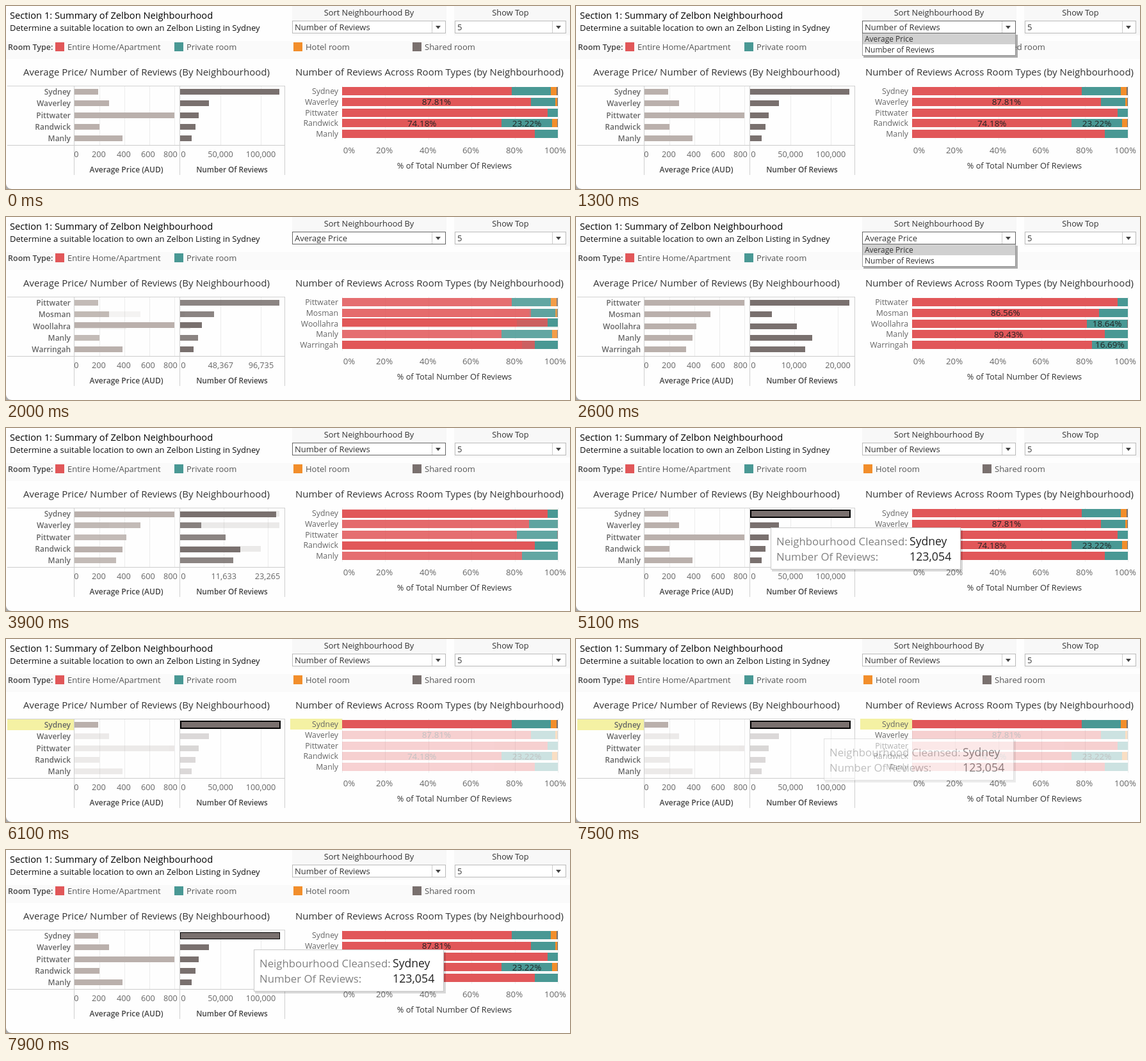
An HTML page that plays this animation: 881x287 px, repeating every 8 s.

```html
<!DOCTYPE html>
<html lang="en">
<head>
<meta charset="utf-8">
<style>
  html, body { margin: 0; width: 100%; height: 100%; overflow: hidden; background: #fefefe; }
  svg { display: block; width: 881px; height: 287px; font-family: "Open Sans", "Noto Sans", sans-serif; }
  rect { shape-rendering: crispEdges; }
</style>
</head>
<body>
<svg id="stage" viewBox="0 0 881 287"></svg>
<script>
const LOOP = 8000, STEP = 100;
const RED = '#e15759', TEAL = '#499894', ORANGE = '#f28e2b', DARK = '#79706e', PALE = '#bab0ac';
const ROOMS = [['Entire Home/Apartment', RED], ['Private room', TEAL], ['Hotel room', ORANGE], ['Shared room', DARK]];

// shares: cumulative percentages per room type
const AREAS = {
  Sydney:    { price: 190, reviews: 123054, shares: [78.5, 96.8, 99.5, 100] },
  Waverley:  { price: 277, reviews: 35700, shares: [87.5, 98.7, 99.6, 100] },
  Pittwater: { price: 800, reviews: 22627, shares: [95.2, 100] },
  Randwick:  { price: 200, reviews: 19000, shares: [74, 97.2, 99.7, 100] },
  Manly:     { price: 385, reviews: 14200, shares: [89.43, 100] },
  Mosman:    { price: 530, reviews: 4960, shares: [86.56, 100] },
  Woollahra: { price: 415, reviews: 10650, shares: [81.1, 99.7, 99.7, 100] },
  Warringah: { price: 333, reviews: 12550, shares: [83.31, 100] }
};
const BY_REVIEWS = {
  names: ['Sydney', 'Waverley', 'Pittwater', 'Randwick', 'Manly'], scale: .00126, tick: 50000,
  labels: { Waverley: ['87.81%'], Randwick: ['74.18%', '23.22%'] }
};
const BY_PRICE = {
  names: ['Pittwater', 'Mosman', 'Woollahra', 'Manly', 'Warringah'], scale: .00685, tick: 10000,
  labels: { Mosman: ['86.56%'], Woollahra: ['', '18.64%'], Manly: ['89.43%'], Warringah: ['', '16.69%'] }
};

const clamp = v => Math.max(0, Math.min(1, v));
const lerp = (a, b, p) => a + (b - a) * p;
const ease = q => q < .5 ? 2 * q * q : 1 - 2 * (1 - q) ** 2;
const within = (t, a, b) => t >= a && t < b;
const leftRow = i => 134.5 + i * 18.35;
const rightRow = i => 133.5 + i * 16.8;

const rect = (x, y, w, h, fill, extra = '') =>
  `<rect x="${x}" y="${y}" width="${w}" height="${h}" fill="${fill}" ${extra}/>`;
const text = (x, y, s, size = 13, fill = '#333', anchor = 'start', weight = 400) =>
  `<text x="${x}" y="${y}" font-size="${size}" fill="${fill}" text-anchor="${anchor}" font-weight="${weight}">${s}</text>`;
const group = (alpha, body) => `<g opacity="${alpha}">${body}</g>`;

function select(x, w, value, focused) {
  const right = x + w;
  return rect(x + .5, 23.5, w - 1, 19, '#fff', `stroke="${focused ? '#666' : '#bbb'}"`) +
    rect(right - 22, 24, 1, 18, '#ccc') +
    `<path d="M${right - 16} 31h8l-4 5z" fill="#444"/>` +
    text(x + 4, 38, value);
}

function header(t, legendCount) {
  const value = within(t, 1900, 3900) ? 'Average Price' : 'Number of Reviews';
  let s = rect(447, 0, 241, 46, '#f8f8f8') + rect(700, 0, 181, 46, '#f8f8f8') + rect(0, 55, 881, 28, '#fafafa') +
    text(6, 20, 'Section 1: Summary of Zelbon Neighbourhood', 14.7, '#000', 'start', 500) +
    text(6, 39, 'Determine a suitable location to own an Zelbon Listing in Sydney', 13, '#111') +
    text(567, 15, 'Sort Neighbourhood By', 12.8, '#333', 'middle', 500) +
    text(788, 15, 'Show Top', 12.8, '#333', 'middle', 500) +
    select(447, 240, value, within(t, 700, 5100)) + select(701, 174, '5') +
    text(3, 69, 'Room Type:', 12.5, '#444', 'start', 600);
  ROOMS.slice(0, legendCount).forEach(([name, color], i) => {
    s += rect(77 + i * 186, 57, 14, 14, color) + text(96 + i * 186, 69, name, 13, '#555');
  });
  return s;
}

function menu(active) {
  return rect(449, 45, 241, 36, '#777', 'opacity=".6"') +
    rect(447.5, 43.5, 239, 34, '#fff', 'stroke="#999"') +
    rect(448, 43 + active * 17.5, 238, 17, '#d0d0d0') +
    text(451, 56, 'Average Price', 12) + text(451, 73, 'Number of Reviews', 12);
}

function axes(from, to, p) {
  const tick = lerp(from.tick, to.tick, p);
  const tickX = i => 272 + i * lerp(from.scale * from.tick, to.scale * to.tick, p);
  let s = '';
  for (let i = 1; i <= 4; i++) s += rect(106.5 + i * 39, 126, 1, 92, '#ececec');
  for (let i = 1; i <= 2; i++) s += rect(tickX(i), 126, 1, 92, '#ececec');
  for (let i = 0; i <= 5; i++) s += rect(525 + i * 67.4, 125, 1, 85, '#eee');
  s += rect(2, 125, 434, 1, '#d2d2d2') + rect(2, 218, 434, 1, '#ccc');
  for (const x of [106, 271, 435]) s += rect(x, 125, 1, 140, '#cfcfcf');

  [110, 145, 184, 222, 257].forEach((x, i) => s += text(x, 237, i * 200, 12.7, '#666', 'middle'));
  s += text(277, 237, 0, 13, '#666', 'middle');
  for (let i = 1; i <= 2; i++)
    s += text(tickX(i), 237, Math.round(i * tick).toLocaleString('en-US'), 12.7, '#666', 'middle');
  [536, 591, 659, 726, 794, 858].forEach((x, i) => s += text(x, 230.5, i * 20 + '%', 13.3, '#666', 'middle'));

  return s + text(219.5, 109, 'Average Price/ Number of Reviews (By Neighbourhood)', 15, '#333', 'middle') +
    text(661.5, 109, 'Number of Reviews Across Room Types (by Neighbourhood)', 15, '#333', 'middle') +
    text(188, 261, 'Average Price (AUD)', 12, '#444', 'middle', 600) +
    text(353, 261, 'Number Of Reviews', 11.7, '#444', 'middle', 600) +
    text(700.5, 255, '% of Total Number Of Reviews', 12.8, '#333', 'middle', 500);
}

function area(name, row, scale, labels = []) {
  const d = AREAS[name], y = leftRow(row) - 4.5, mid = rightRow(row);
  let s = rect(107, y, d.price * .195, 9, PALE) +
    rect(272, y, Math.min(155, d.reviews * scale), 9, DARK), start = 0;
  d.shares.forEach((end, i) => {
    s += rect(525 + start * 3.37, mid - 6.5, (end - start) * 3.37, 13, ROOMS[i][1]);
    if (labels[i]) s += text(525 + (start + end) * 1.685, mid + 4.7, labels[i], 13.5, '#222', 'middle');
    start = end;
  });
  return s;
}

function charts(from, to, q, dim) {
  const p = ease(q), scale = lerp(from.scale, to.scale, p);
  let s = axes(from, to, p);
  if (dim) s += group(dim, rect(2, 126, 104, 17, '#f4f1a3') + rect(444, 125, 81, 17, '#f4f1a3'));
  for (const name in AREAS) {
    const i = from.names.indexOf(name), j = to.names.indexOf(name);
    const row = i < 0 ? j : j < 0 ? i : lerp(i, j, p);
    let alpha = i < 0 ? q : j < 0 ? 1 - q : 1;
    if (name !== 'Sydney') alpha *= lerp(1, .27, dim);
    if (alpha > 0) s += group(alpha, area(name, row, scale, q === 1 ? to.labels[name] : []));
  }
  to.names.forEach((name, i) => {
    s += text(101, leftRow(i) + 4.5, name, 12, '#666', 'end', 600) +
      text(519, rightRow(i) + 4.5, name, 12.3, '#666', 'end');
  });
  return s;
}

function tooltip(x, tools) {
  const top = tools ? 120.5 : 156.5, w = tools ? 331 : 296, bottom = 221.5;
  let s = rect(x + 2, top + 2, w + 2, bottom - top + 1, '#000', 'opacity=".15"') +
    rect(x + .5, top, w, bottom - top, '#fff', 'stroke="#c8c8c8"');
  if (tools) s += rect(x + 1, 156, w - 1, 1, '#ddd') +
    `<path d="M${x + 12} 138l4 4 8-9" fill="none" stroke="#555" stroke-width="2"/>` +
    text(x + 30, 143, 'Keep Only', 15, '#444') +
    `<path d="M${x + 126} 133l9 9m0-9l-9 9" stroke="#555" stroke-width="2"/>` +
    text(x + 142, 143, 'Exclude', 15, '#444');
  return s + text(x + 9, 184, 'Neighbourhood Cleansed:', 16.8, '#808080') +
    text(x + 9, 208, 'Number Of Reviews:', 16.8, '#808080') +
    text(x + 217, 184, 'Sydney', 17.6, '#222', 'start', 500) +
    text(x + 217, 208, '123,054', 17.8, '#222', 'start', 500);
}

function scene(t) {
  const priceSorted = within(t, 2000, 3900);
  const [from, to] = priceSorted ? [BY_REVIEWS, BY_PRICE] : [BY_PRICE, BY_REVIEWS];
  const q = t < 2000 ? 1 : clamp((t - (priceSorted ? 1950 : 3850)) / 350);
  const dim = t < 7900 ? clamp((t - 5100) / 200) : 0;

  let s = header(t, priceSorted ? 2 : 4) + charts(from, to, q, dim) +
    '<path d="M0 279Q1 286 9 287H0z" fill="#aaa"/>';
  if (within(t, 5100, 7900)) s += rect(273, 129, 155, 11, DARK, 'stroke="#000" stroke-width="2"');
  else if (t >= 4800) s += rect(272.5, 129.5, 155, 10, DARK, 'stroke="#000"');

  if (within(t, 1000, 1600)) s += menu(t < 1300 ? 1 : 0);
  if (within(t, 2600, 3600)) s += menu(t < 3300 ? 0 : 1);
  if (within(t, 4800, 6100)) s += group(t < 4900 ? .5 : 1, tooltip(304, t >= 5300));
  if (t >= 7500) s += group(t < 7600 ? .5 : 1, tooltip(387, false));
  return s;
}

const stage = document.getElementById('stage');
let shown = -1;
function frame() {
  const t = Math.floor(performance.now() % LOOP / STEP) * STEP;
  if (t !== shown) stage.innerHTML = scene(shown = t);
  requestAnimationFrame(frame);
}
frame();
</script>
</body>
</html>
```
